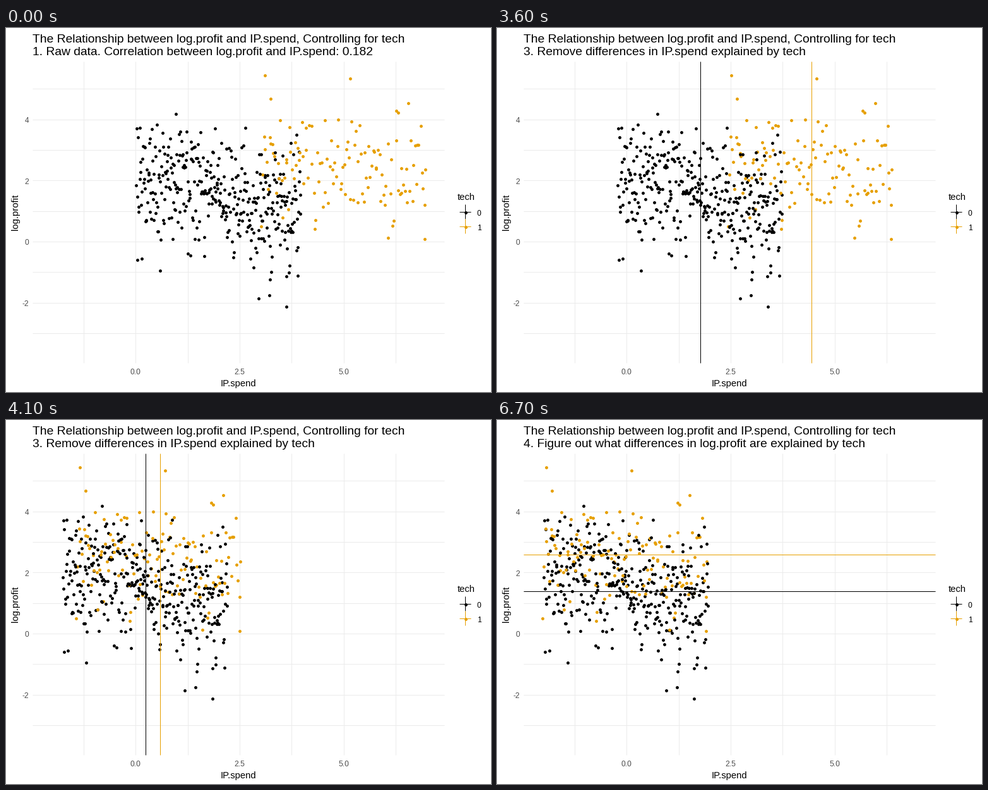
A matplotlib script that plays this animation: 768x576 px, repeating every 8000 ms.

```python
import numpy as np
import matplotlib.pyplot as plt
from matplotlib.animation import FuncAnimation

W, H, DPI = 768, 576, 96
PT = 72 / DPI  # points per pixel
FRAMES, STEP = 80, 100
LEFT, RIGHT, TOP, BOTTOM = 42, 694, 53, 530
X0, Y0, X_UNIT, Y_UNIT = 205.3, 337.95, 65.85, 48.3
BLACK, ORANGE, GRID, TICK = "#000000", "#E69F00", "#EBEBEB", "#4D4D4D"
MEAN_SHIFT = {BLACK: 132, ORANGE: 332}
MEAN_Y = {BLACK: 271, ORANGE: 213}

HEADING = "The Relationship between log.profit and IP.spend, Controlling for tech"
STAGES = [
    (0, "1. Raw data. Correlation between log.profit and IP.spend: 0.182"),
    (500, "2. Figure out what differences in IP.spend are explained by tech"),
    (3500, "3. Remove differences in IP.spend explained by tech"),
    (6400, "4. Figure out what differences in log.profit are explained by tech"),
]

# Extreme observations, in stage pixels
BLACK_EXTREMES = [(269, 136), (400, 428), (417, 423), (444, 441)]
ORANGE_EXTREMES = [(410, 75), (545, 80), (419, 112), (621, 134), (663, 334)]


def sample(rng, count, x_range, y_trend, spread, y_range):
    """Even scatter in x; normal in y around a linear trend."""
    u = (np.arange(count) + rng.uniform(0, 1, count)) / count
    y = np.interp(u, (0, 1), y_trend) + rng.normal(0, spread, count)
    low, high = y_range
    outside = (y < low) | (y > high)
    y[outside] = rng.uniform(low, high, outside.sum())
    return np.column_stack([np.interp(u, (0, 1), x_range), y])


def make_points():
    rng = np.random.default_rng(7)
    black = np.vstack([
        BLACK_EXTREMES,
        sample(rng, 370, (206, 467), (246, 290), 52, (147, 400)),
    ])
    orange = np.vstack([
        ORANGE_EXTREMES,
        sample(rng, 125, (404, 666), (195, 231), 48, (115, 350)),
    ])
    points = np.vstack([black, orange])
    colors = np.array([BLACK] * len(black) + [ORANGE] * len(orange))
    order = rng.permutation(len(points))
    return points[order], colors[order]


plt.rcParams["font.family"] = "Liberation Sans"
fig = plt.figure(figsize=(W / DPI, H / DPI), dpi=DPI, facecolor="white")
ax = fig.add_axes([0, 0, 1, 1])
ax.set_xlim(0, W)
ax.set_ylim(H, 0)
ax.axis("off")


def label(x, y, text, size, color=BLACK, **kw):
    return ax.text(x, y, text, fontsize=size * PT, color=color, **kw)


def line(x1, y1, x2, y2, color, z=1):
    return ax.plot([x1, x2], [y1, y2], color=color, lw=PT, zorder=z,
                   solid_capstyle="butt")[0]


def dots(points, colors, z=3):
    return ax.scatter(points[:, 0], points[:, 1], s=(4.9 * PT) ** 2, c=colors,
                      linewidths=0, zorder=z)


def to_pixels(x, y):
    return np.column_stack([np.round(x) + 0.5, np.round(y) + 0.5])


for v in np.arange(-1.25, 6.3, 1.25):
    x = X0 + X_UNIT * v
    line(x, TOP, x, BOTTOM, GRID)
for v in range(-3, 6):
    y = Y0 - Y_UNIT * v
    line(LEFT, y, RIGHT, y, GRID)
for v in (0.0, 2.5, 5.0):
    label(X0 + X_UNIT * v, 548, f"{v:.1f}", 12, TICK, ha="center")
for v in (-2, 0, 2, 4):
    label(36, Y0 - Y_UNIT * v + 5.5, str(v), 12, TICK, ha="right")

label(42, 23, HEADING, 19.2)
subtitle = label(42, 43, "", 19.2)
label(367.5, 567, "IP.spend", 14.8, ha="center")
label(15, 291, "log.profit", 14.8, rotation=90, ha="center", va="center")

label(715, 272, "tech", 14.8)
for name, y, color in (("0", 291, BLACK), ("1", 314, ORANGE)):
    line(718, y, 736, y, color, 2)
    line(727, y - 12, 727, y + 11, color, 2)
    dots(np.array([[727.5, y + 0.5]]), color)
    label(746, y + 6, name, 12)

points, colors = make_points()
shift = np.array([MEAN_SHIFT[c] for c in colors])
cloud = dots(points, colors)
v_lines = {c: line(X0, TOP, X0, BOTTOM, c, 4) for c in MEAN_SHIFT}
h_lines = [line(LEFT, y, RIGHT, y, c, 4) for c, y in MEAN_Y.items()]


def update(frame):
    t = frame * STEP
    subtitle.set_text([text for start, text in STAGES if t >= start][-1])

    progress = np.clip((t - 3400) / 900, 0, 1)
    eased = (1 - np.cos(np.pi * progress)) / 2
    cloud.set_offsets(to_pixels(points[:, 0] - shift * eased, points[:, 1]))

    for color, v_line in v_lines.items():
        x = round(X0 + MEAN_SHIFT[color] * (1 - eased))
        v_line.set_xdata([x, x])
        v_line.set_visible(800 <= t < 6400)
    for h_line in h_lines:
        h_line.set_visible(t >= 6700)
    return [cloud, subtitle, *v_lines.values(), *h_lines]


anim = FuncAnimation(fig, update, frames=FRAMES, interval=STEP,
                     repeat=True, repeat_delay=0, blit=False)
plt.show()
```
